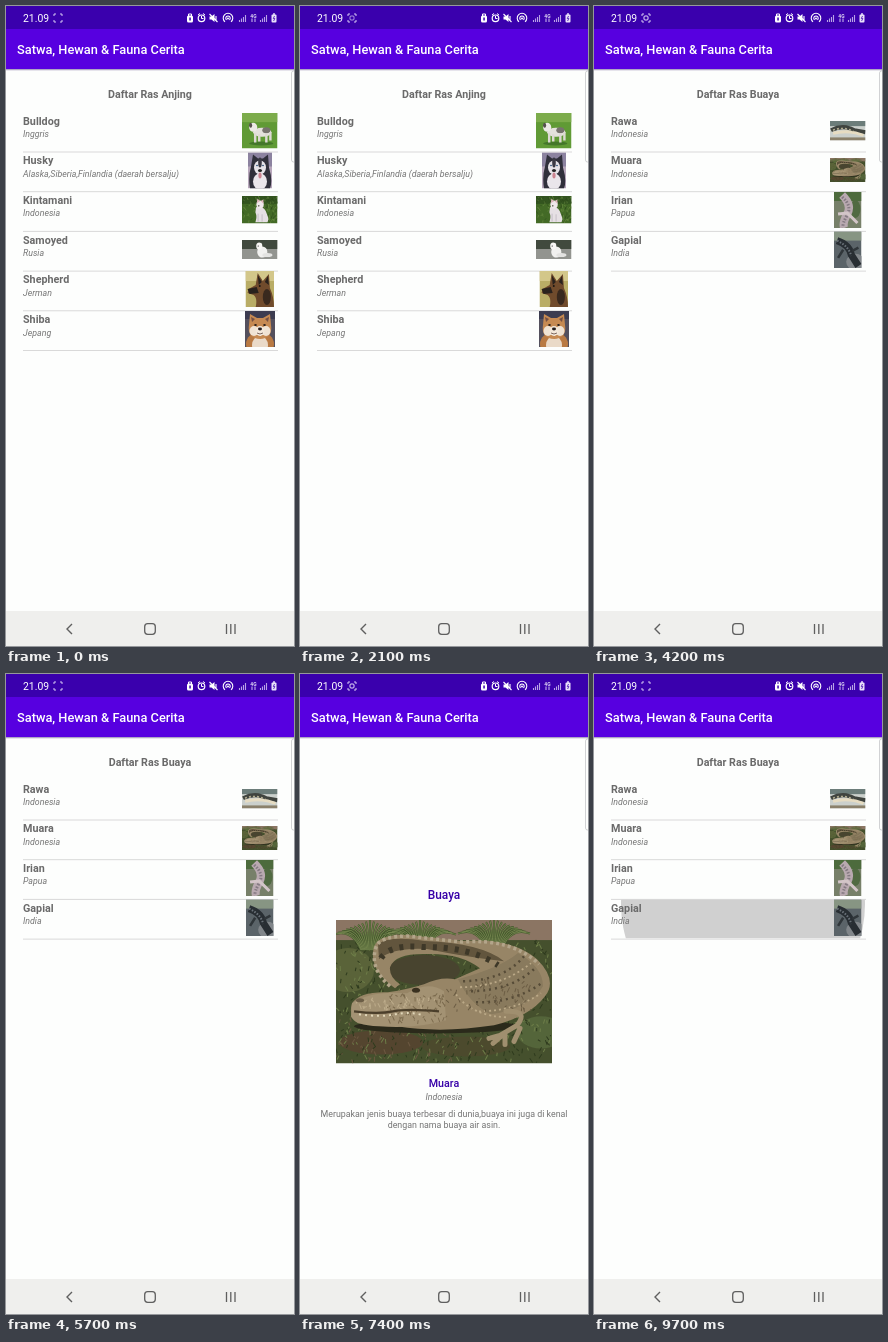
Recreate the animation shown at these times as an HTML page. Size 288 by 640 pixels, loop 10 s.

```html
<!DOCTYPE html>
<html lang="id">
<head>
<meta charset="utf-8">
<title>Satwa, Hewan &amp; Fauna Cerita</title>
<style>
html, body { margin: 0; width: 100%; height: 100%; overflow: hidden; background: #fdfefd }
#stage { display: block; width: 288px; height: 640px; font-family: Roboto, sans-serif }
.b { font-weight: 700 }
.m { font-weight: 500 }
.i { font-style: italic }
.c { text-anchor: middle }
</style>
</head>
<body>
<svg id="stage" viewBox="0 0 288 640"></svg>
<script>
const APP = 'Satwa, Hewan &amp; Fauna Cerita';
const GREY = '#757575', INK = '#3700a8';
const PITCH = 39.7;

const rect = (x, y, w, h, fill, more = '') =>
  `<rect x="${x}" y="${y}" width="${w}" height="${h}" fill="${fill}" ${more}/>`;
const oval = (x, y, rx, ry, fill, turn = 0) =>
  `<ellipse cx="${x}" cy="${y}" rx="${rx}" ry="${ry}" fill="${fill}" transform="rotate(${turn} ${x} ${y})"/>`;
const shape = (d, fill) => `<path d="${d}" fill="${fill}"/>`;
const line = (d, color, width, more = '') =>
  `<path d="${d}" fill="none" stroke="${color}" stroke-width="${width}" ${more}/>`;
const text = (x, y, size, fill, cls, str) =>
  `<text x="${x}" y="${y}" font-size="${size}" fill="${fill}" class="${cls}">${str}</text>`;
const dash = (...n) => `stroke-dasharray="${n.join(' ')}"`;

let seed = 7;
const rnd = () => (seed = seed * 16807 % 2147483647) / 2147483647;

const tuft = (x, y, h) => {
  let d = '';
  for (let k = -9; k <= 9; k++) d += `M${x + k} ${y}Q${x + k * 2} ${y - h * .7} ${x + k * 4} ${y - h + Math.abs(k) * 1.6}`;
  return line(d, '#43562b', 2) + line(d, '#8f9f62', .6);
};
// Short random blades filling a box
const blades = (n, x, y, w, h, color) => {
  let d = '';
  while (n--) d += `M${x + rnd() * w} ${y + rnd() * h}l${rnd() * 6 - 3} ${-1 - rnd() * 4}`;
  return line(d, color, 1);
};

// Pictures: width, height, content
const pics = {
  bulldog: [35, 35, rect(0, 0, 35, 35, '#609a35') + rect(0, 0, 35, 9, '#7cac4b') +
    oval(19, 30, 12, 2, '#44772a') + oval(20, 19, 9, 4.5, '#e4e1dc') + oval(24, 17, 4, 3, '#77736e') +
    oval(11, 14, 4, 4.5, '#ece9e5') + oval(8.5, 12, 1.5, 2.5, '#55504c') +
    line('M13 20V29M17 21V28M24 20V29M28 19V27', '#ddd9d3', 2.4)],
  husky: [24, 36, rect(0, 0, 24, 36, '#b7a7bb') + rect(0, 0, 24, 14, '#8c83a0') +
    shape('M3 14L5 2L10 6H15L20 2L21 15Q25 28 22 36H2Q0 24 3 14Z', '#30303b') +
    oval(12, 15, 6, 7, '#e6e3e8') + oval(12, 10, 1.8, 5, '#3a3944') + oval(12, 29, 7, 8, '#eae6eb') +
    oval(9, 13, 1, .8, '#3c5e83') + oval(15, 13, 1, .8, '#3c5e83') + oval(12, 18, 2, 1.5, '#222') + oval(12, 23, 1.6, 3, '#cc8591')],
  kintamani: [53, 42, rect(0, 0, 53, 42, '#436a26') + rect(0, 0, 53, 12, '#33541f') +
    blades(70, 0, 3, 53, 39, '#6a8c42') + blades(50, 0, 3, 53, 39, '#2d4a1a') +
    shape('M21 17Q33 14 37 27Q41 36 38 40H20Q23 32 20 25Z', '#e6e0e4') + oval(27, 13, 5.5, 6, '#efe8ea') +
    shape('M22 11L23 4L27 8ZM28 8L32 5L32 12Z', '#dfb8bd') + oval(25, 15, 1.3, 1, '#332') +
    line('M24 27V39M30 28V39', '#bdb5bf', 1.2)],
  samoyed: [35, 19, rect(0, 0, 35, 19, '#92948f') + rect(0, 0, 35, 9, '#414a3e') +
    oval(20, 12, 5, 5.5, '#f1f1ef') + oval(17, 6, 3, 3.5, '#f8f7f5') + oval(25, 15, 5, 2, '#e3e3e1') + oval(16, 6, .7, .6, '#333')],
  shepherd: [28, 36, rect(0, 0, 28, 36, '#b9ad66') + rect(0, 0, 28, 10, '#d3c78a') +
    shape('M10 14L12 2L17 10L23 3L24 17Q28 26 28 36H10Q12 27 8 24L2 22L3 18Z', '#704b2c') +
    shape('M12 4L16 11L13 14ZM22 5L23 14L19 11ZM2 18L11 16L13 22L4 23Z', '#29221d') +
    oval(21, 26, 4, 8, '#39291e') + oval(14, 15, 1, .9, '#1b1512')],
  shiba: [30, 36, rect(0, 0, 30, 36, '#54505d') + rect(0, 0, 30, 8, '#3c3c50') + oval(15, 33, 14, 12, '#b97a43') +
    oval(15, 34, 8, 9, '#eadac8') + shape('M4 14L5 3L12 7H18L25 3L26 14Q28 27 15 28Q2 27 4 14Z', '#c68a52') +
    shape('M6 6L7 11L10 8ZM24 6L23 11L20 8Z', '#755044') + oval(9, 20, 4.5, 5, '#f0e3d3') + oval(21, 20, 4.5, 5, '#f0e3d3') +
    oval(15, 20, 4.5, 5, '#f3e8da') + oval(10.5, 14, 1.3, .9, '#271d1a') + oval(19.5, 14, 1.3, .9, '#271d1a') +
    oval(15, 18, 2, 1.4, '#231c1c') + line('M12 22Q15 24 18 22', '#4a302a', .7)],
  rawa: [35, 19, rect(0, 0, 35, 19, '#cbd0cc') + rect(0, 0, 35, 5, '#6c7d7a') + rect(0, 16, 35, 3, '#8b816b') +
    line('M1 9Q13 3 24 9L35 11', '#40443f', 4) + line('M3 12Q18 8 33 14', '#e6dcc2', 3) + line('M3 9Q13 5 23 10', '#b2ad91', 1.5, dash(2, 2))],
  irian: [27, 36, rect(0, 0, 27, 36, '#778069') + rect(0, 0, 27, 9, '#4d6b3d') + oval(21, 17, 5, 9, '#516a42') +
    line('M8 3Q18 13 13 22T10 36', '#b9a9b0', 8) + line('M8 5Q18 14 13 23T9 35', '#857a83', 3, dash(1.5, 1.5)) + line('M4 22L13 21L23 31', '#d3c5c8', 3)],
  gapial: [27, 36, rect(0, 0, 27, 36, '#5b6469') + rect(0, 0, 27, 9, '#879583') + oval(21, 30, 9, 8, '#81868a') +
    line('M3 9Q15 13 17 23L24 34', '#282e33', 7) + line('M3 9Q14 14 17 24', '#697178', 2, dash(1.5, 1.5)) + line('M9 18L4 26M18 19L24 16', '#30363a', 2.5)],
  cat: [53, 44, rect(0, 0, 53, 44, '#4b4743') + rect(0, 33, 53, 11, '#7b6c60') + rect(44, 8, 9, 32, '#74706b') +
    oval(6, 22, 6, 16, '#2f2c2a') + shape('M10 40Q3 30 9 20L13 16Q17 26 15 40Z', '#cfccc9') +
    shape('M13 17Q22 11 32 14L48 22Q51 30 47 42H42L40 34L35 43H30L28 34L20 41H14Q10 28 13 17Z', '#e3e1df') +
    oval(37, 12, 9, 9.5, '#efedeb') + shape('M28 9L29 0L35 4ZM39 4L44 0L46 9Z', '#d8d4d0') +
    oval(34, 12, 1, .8, '#544a34') + oval(40, 12, 1, .8, '#544a34') + oval(37, 15, 1, .7, '#bb8d88')],
  river: [65, 89, rect(0, 0, 65, 89, '#958c80') + shape('M0 0H65V36L42 22L26 28L0 12Z', '#56524a') +
    shape('M22 0H65V14L46 8Z', '#7d735f') + shape('M0 36L12 44L20 62L0 58Z', '#5c5853') +
    oval(54, 27, 13, 7, '#aba291', 25) + oval(12, 76, 18, 8, '#aba192') + oval(55, 50, 11, 10, '#a39a8d') +
    shape('M27 62L46 84L58 86L36 67Z', '#5e5952') +
    shape('M3 12Q13 11 20 23L42 44Q50 58 64 82L58 84L36 64Q20 55 13 39Z', '#424755') +
    line('M16 45L4 47M29 29L39 24M39 59L28 66M43 49L54 46', '#484d59', 4) +
    line('M8 18Q24 42 53 74', '#7c8595', 3, dash(1.5, 2.5)) + line('M15 37Q22 52 42 64M14 19L42 49', '#2b2f39', 2, dash(4, 2))],
  muara: [216, 143, rect(0, 0, 216, 143, '#45502d') + rect(0, 0, 216, 20, '#8b7563') + oval(45, 122, 42, 12, '#54452f') +
    oval(130, 126, 44, 10, '#4c4a2d') + oval(12, 50, 26, 22, '#5a6339') + oval(205, 112, 24, 16, '#54653a') +
    blades(260, 0, 24, 216, 119, '#6d7d48') + blades(320, 0, 24, 216, 119, '#2e3a1d') + blades(60, 0, 100, 120, 43, '#6b5840') +
    tuft(34, 30, 30) + tuft(84, 25, 25) + tuft(158, 26, 27) + oval(88, 50, 36, 15, '#48442f') +
    oval(100, 106, 82, 7, '#2b2a1b') +
    shape('M59 68Q32 49 38 27Q42 14 72 15L126 21Q175 17 201 39Q222 60 209 76Q194 96 158 105Q105 113 61 106L22 103Q12 96 16 83Q24 71 52 72Q72 69 88 64Q105 56 119 59L144 48Q123 32 87 34Q59 34 54 47Q53 57 64 64Z', '#978566') +
    shape('M42 24Q54 15 89 21Q145 23 168 41Q137 38 91 29Q58 27 43 39Z', '#62553d') +
    shape('M122 59Q164 48 182 33Q207 47 207 66Q194 88 155 94Q134 84 122 59Z', '#897a5d') +
    line('M54 66Q33 48 40 27Q44 16 72 16L126 22Q176 18 203 44', '#b3a58a', 3.5, dash(3, 3)) +
    line('M45 38Q54 24 86 27Q133 26 162 45', '#3e3828', 6, dash(4, 7)) +
    line('M127 61Q169 60 188 36M135 71Q176 70 199 48M140 82Q178 83 207 62', '#564b37', 2.5, dash(2, 4)) +
    line('M124 67Q165 67 195 43M143 91Q178 91 205 73M120 74Q136 96 172 97', '#bba987', 1.8, dash(2, 3)) +
    shape('M16 83Q34 70 71 73Q92 60 108 71L110 100Q79 109 43 106Q18 105 15 96Z', '#a39273') +
    blades(70, 50, 76, 60, 28, '#7c6b4e') + blades(60, 112, 62, 84, 30, '#6c5d44') + blades(40, 20, 80, 80, 10, '#bdac8b') +
    line('M18 91Q43 94 57 91T103 91', '#4b3f2b', 2.2) + line('M23 94Q45 97 59 94T88 95', '#e1d7b9', 2, dash(2, 4)) +
    oval(80, 70, 4, 2.5, '#39301f') + oval(24, 80, 4, 2, '#6b5d46') +
    line('M170 91Q193 90 181 105L164 115M184 108L178 121M164 115L153 118M166 115L157 123M169 114L169 124', '#a08f6f', 5, 'stroke-linecap="round"')]
};
const pic = (name, x, y, w, h) =>
  `<svg x="${x}" y="${y}" width="${w}" height="${h}" viewBox="0 0 ${pics[name][0]} ${pics[name][1]}" preserveAspectRatio="none">${pics[name][2]}</svg>`;

const page = (id, body) => `<g id="${id}">` +
  rect(0, 0, 288, 660, '#fdfefd') + rect(0, 63, 288, 1, '#aea6c4') + rect(0, 64, 288, 1, '#e6e4ec') +
  rect(0, 0, 288, 23.5, '#3a00ad') + rect(0, 23, 288, 40, '#5700e0') + rect(0, 605, 288, 55, '#efefed') +
  text(11, 48, 12.8, '#fff', 'm', APP) + body + '</g>';

const list = (id, title, rows) => page(id,
  `<svg class="row" x="17" width="255" height="39"><circle cx="132" cy="5" fill="#d0d0d0"/></svg>` +
  text(144, 92, 10.7, '#6a6a6a', 'b c', title) +
  rows.map(([name, place, img, ...box], k) => {
    const y = k * PITCH;
    return text(17, 118.5 + y, 10.75, '#6a6a6a', 'b', name) + text(17, 131 + y, 8.8, GREY, 'i', place) +
      rect(17, 145.5 + y, 255, 1, '#d9d9d9') + pic(img, ...box);
  }).join(''));

const detail = (id, kind, name, place, about, img, ...box) => page(id,
  text(144, 225, 11.9, INK, 'm c', kind) + pic(img, ...box) +
  text(144, 413, 10.7, INK, 'm c', name) + text(144, 425.5, 8.8, GREY, 'i c', place) +
  about.map((s, k) => text(144, 443 + k * 11, 8.87, GREY, 'c', s)).join(''));

const home = page('home',
  text(144, 252, 15.85, INK, 'b c', APP) +
  [[25, 290], [111.5, 290], [195.5, 287]].map(([x, y]) => rect(x, y, 70.5, 99, '#d3d5d3', 'rx="1"')).join('') +
  pic('cat', 34, 317, 53, 44) + pic('kintamani', 120, 318, 53, 42) + pic('river', 198, 292, 65, 89) +
  text(144, 408.5, 8.8, GREY, 'i c', '(Pilih gambar untuk membuka galeri)'));

const dogs = list('dogs', 'Daftar Ras Anjing', [
  ['Bulldog', 'Inggris', 'bulldog', 236, 107, 35.5, 35.5],
  ['Husky', 'Alaska,Siberia,Finlandia (daerah bersalju)', 'husky', 242, 146.5, 24, 36],
  ['Kintamani', 'Indonesia', 'kintamani', 236, 190, 35.5, 27.5],
  ['Samoyed', 'Rusia', 'samoyed', 236, 234, 35.5, 19],
  ['Shepherd', 'Jerman', 'shepherd', 239.5, 265, 28.5, 36],
  ['Shiba', 'Jepang', 'shiba', 239, 305, 30, 36]]);

const crocs = list('crocs', 'Daftar Ras Buaya', [
  ['Rawa', 'Indonesia', 'rawa', 236, 115, 35.5, 19.5],
  ['Muara', 'Indonesia', 'muara', 236, 152, 35.5, 24],
  ['Irian', 'Papua', 'irian', 240, 186, 27.5, 36],
  ['Gapial', 'India', 'gapial', 240, 225.5, 27.5, 36.5]]);

const shiba = detail('shibaPage', 'Anjing', 'Shiba', 'Jepang',
  ['Merupakan jenis anjing kecil dari Jepang,anjing ini juga di', 'kenal setia dan lincah.'], 'shiba', 84, 246, 120, 143.5);
const muara = detail('muaraPage', 'Buaya', 'Muara', 'Indonesia',
  ['Merupakan jenis buaya terbesar di dunia,buaya ini juga di kenal', 'dengan nama buaya air asin.'], 'muara', 36, 246, 216, 143.5);

const signal = x => line(`M${x} 16V14M${x + 2} 16V12.5M${x + 4} 16V11M${x + 6} 16V9`, '#b9a3e6', 1.1);
const system =
  text(17, 16, 10.4, '#fff', '', '21.09') +
  line('M48 10V8H50M54 8H56V10M56 14V16H54M50 16H48V14', '#d5c8f2', 1) +
  `<g id="rec">${rect(50, 10, 4, 4, 'none', 'stroke="#e6ddfa" rx="1"')}</g>` +
  rect(181, 9.5, 6, 7, '#fff', 'rx="1.5"') + line('M182.5 10V8H185.5V10', '#fff', 1) + rect(183.3, 11.5, 1.5, 3, '#3a00ad') +
  line('M192 9L194 7.5M199 9L197 7.5M195.5 10V12.5H197.5', '#fff', 1) + `<circle cx="195.5" cy="12.3" r="3.3" fill="none" stroke="#fff" stroke-width="1.2"/>` +
  shape('M203.5 10.5H205.5L208.5 8V16L205.5 13.5H203.5Z', '#fff') + line('M203.5 8L211.5 16M210 10V14', '#fff', 1.1) +
  line('M219 15.8A4.8 4.8 0 1 1 225 15.8M220.6 13.9A2.2 2.2 0 1 1 223.4 13.9', '#fff', 1.1) + oval(222, 12.4, 1, 1, '#fff') +
  signal(233.5) + text(247.5, 11.8, 5, '#e3daf6', 'b c', '4G') + line('M246 16V12.5M249 12.5V16', '#d0c0f0', 1) + signal(254.5) +
  rect(265.5, 8.5, 5, 8, '#e9e1fa', 'rx="1"') + rect(267, 7.3, 2, 1.5, '#e9e1fa') + line('M268.5 10L267.3 12.5H268.8L267.6 15', '#3a00ad', .8) +
  rect(285.5, 65, 6, 91, '#fff', 'fill-opacity=".1" rx="2" stroke="#a0a2a6" stroke-opacity=".6" stroke-width=".8"') +
  rect(21.5, 605.5, 84, 34.5, '#dddddb', 'rx="17" id="press"') +
  line('M66 618L61 623L66 628', '#5f5f5f', 1.4) +
  rect(138.7, 617.7, 10.6, 10.6, 'none', 'rx="3" stroke="#5f5f5f" stroke-width="1.3"') +
  line('M220.5 618V628M224.8 618V628M229 618V628', '#5f5f5f', 1.3);

const $ = s => document.querySelector(s);
$('#stage').innerHTML = home + dogs + shiba + crocs + muara + system;

// Page, opening time, closing time
const visits = [['dogs', -1000, 2600], ['shibaPage', 450, 1700], ['crocs', 3700, 2e4], ['muaraPage', 6850, 8600]];
// List, row, time of the tap
const taps = [['dogs', 5, 300], ['crocs', 1, 6700], ['crocs', 3, 9500]];
const backs = [1500, 2500, 8400];
const clamp = v => Math.max(0, Math.min(1, v));

function draw(t) {
  for (const [id, start, end] of visits) {
    const p = clamp((t - start) / 500), q = clamp((t - end) / 400);
    const g = $('#' + id);
    const alpha = clamp(p * 3.5) * (1 - q);
    g.style.display = alpha ? '' : 'none';
    g.setAttribute('opacity', alpha);
    g.setAttribute('transform', `translate(0 ${55 * (1 - p) ** 3 + 40 * q * q})`);
  }
  document.querySelectorAll('.row').forEach(r => r.style.display = 'none');
  for (const [id, row, start] of taps) {
    const age = t - start;
    if (age < 0 || age > 600) continue;
    const r = $(`#${id} .row`);
    r.style.display = '';
    r.setAttribute('y', 106.2 + row * PITCH);
    r.firstChild.setAttribute('r', Math.min(122, 30 + age * .46));
  }
  const age = Math.min(...backs.map(b => t < b ? 1e4 : t - b));
  $('#press').setAttribute('opacity', clamp((400 - age) / 250) * clamp((age + 50) / 100));
  const beat = t % 1000;
  $('#rec').setAttribute('opacity', beat < 700 ? clamp(beat / 150) : 0);
}

const begin = performance.now();
function tick() {
  const t = Math.floor((performance.now() - begin) % 10000 / 100) * 100;
  draw(Math.min(t, 9700));
  requestAnimationFrame(tick);
}
tick();
</script>
</body>
</html>
```
